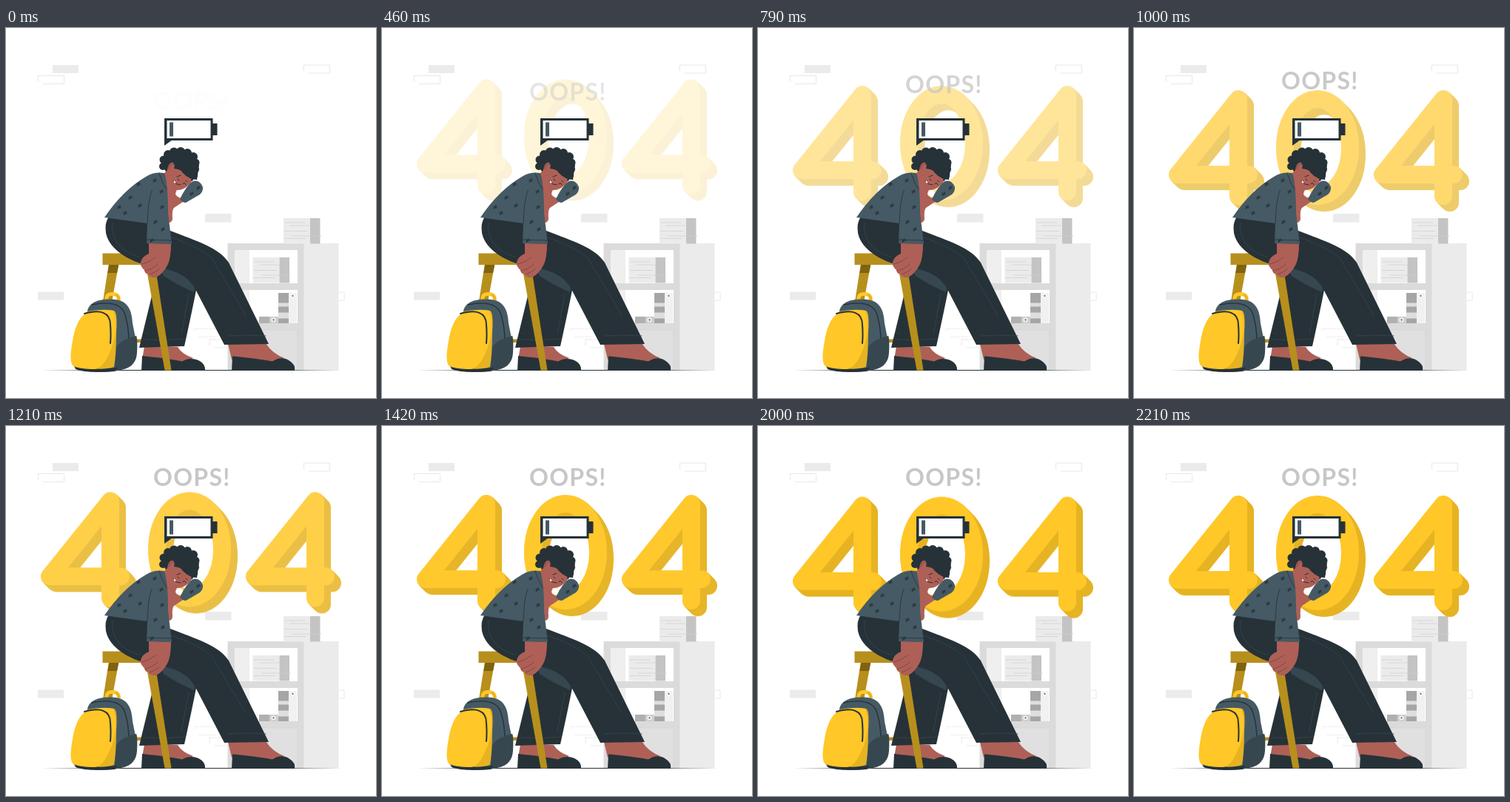
Recreate the animation shown at these times as an HTML page with a canvas. Size 500 by 500 pixels, loop 2.25 s.

```html
<!DOCTYPE html>
<html lang="en">
<head>
<meta charset="utf-8">
<title>404</title>
<style>
  html, body { margin: 0; width: 100%; height: 100%; overflow: hidden; background: #fff; }
  canvas { display: block; width: 100vw; height: 100vh; }
</style>
</head>
<body>
<canvas id="stage"></canvas>
<script>
const SIZE = 500, LOOP = 2250, STEPS = 54, RISE_STEPS = 26;
const ratio = Math.max(1, window.devicePixelRatio || 1);
const YELLOW = '#ffc727', AMBER = '#e6b323', DARK = '#263238', SLATE = '#455a64',
      MID = '#37474f', SKIN = '#ae6057', CREASE = '#7f3e3b', WOOD = '#b78f1d',
      PALE = '#ebebeb', GREY = '#c7c7c7';

function setup(canvas) {
  canvas.width = canvas.height = SIZE * ratio;
  const c = canvas.getContext('2d');
  c.scale(ratio, ratio);
  c.lineCap = c.lineJoin = 'round';
  return c;
}

function layer(paint) {
  const canvas = document.createElement('canvas');
  const c = setup(canvas);
  paint({
    c,
    fill(color, d) { c.fillStyle = color; c.fill(new Path2D(d)); },
    line(color, width, d) {
      c.strokeStyle = color;
      c.lineWidth = width;
      c.stroke(new Path2D(d));
    },
    rect(color, x, y, w, h) { c.fillStyle = color; c.fillRect(x, y, w, h); },
    oval(color, x, y, rx, ry = rx) {
      c.fillStyle = color;
      c.beginPath();
      c.ellipse(x, y, rx, ry, 0, 0, 7);
      c.fill();
    }
  });
  return canvas;
}

function papers({ rect, line }, x, y) {
  rect(PALE, x, y, 36, 34.5);
  rect('#c4c4c4', x + 36, y, 13.5, 34.5);
  [[6, 2, 29], [10, 9, 35], [17.5, 2, 32], [24, 12, 51], [27.5, 2, 30]].forEach(([dy, a, b]) =>
    line('#cfcfcf', 0.7, `M${x + a} ${y + dy}H${x + b}`));
}

const room = layer(p => {
  const { fill, line, rect, oval } = p;
  rect(PALE, 63, 50, 35, 11);
  rect(PALE, 269, 251, 35.5, 11.5);
  rect(PALE, 43, 356.5, 35, 11);
  [[43.5, 64.5], [402.5, 50], [422, 357], [275, 421]].forEach(([x, y]) =>
    line('#e6e6e6', 0.9, `M${x} ${y + 8}V${y}H${x + 35}V${y + 11}H${x + 7}`));
  line('#ececec', 0.8, 'M254 409V406.5H301M260 417.5H285');

  rect(PALE, 402, 291, 47.5, 171.5);
  rect('#dbdbdb', 299.5, 291, 103, 171.5);
  [300, 354].forEach(y => {
    rect('#efefef', 309, y, 20, 45);
    rect('#fff', 329, y, 65, 45);
  });
  rect('#e0e0e0', 309, 408, 85, 54.5);
  line('#d0d0d0', 0.6, 'M309 408H394V462');
  papers(p, 375, 257);
  papers(p, 333.5, 310);

  rect('#f1f1f1', 382, 358, 11, 41);
  rect('#a6a6a6', 368, 358, 14, 41);
  rect('#dedede', 368, 371.5, 14, 5);
  rect('#dedede', 368, 384.5, 14, 8);
  rect('#cfcfcf', 342, 390, 26, 9);
  rect('#b0b0b0', 342, 390, 14, 9);
  [[387.5, 362], [361.5, 394.5]].forEach(([x, y]) => {
    oval('#fff', x, y, 2.8);
    oval('#8f8f8f', x, y, 1.4);
  });
  fill(DARK, 'M47 462.5L150 461.9H350L453 462.5L350 463.1H150Z');
});

const four = x => `M${x} 237V106L${x - 82} 208H${x + 14}`;
const numerals = layer(({ c, line }) => {
  const zero = 'M204 171.5a44 65.5 0 1 1 88 0a44 65.5 0 1 1 -88 0Z';
  const paths = [four(141), zero, four(418)];
  for (let i = 18; i >= 0; i--) {
    c.save();
    c.translate(i / 2, i / 2);
    paths.forEach(d => line(i ? AMBER : YELLOW, 24, d));
    c.restore();
  }
});

function stool({ fill }) {
  fill(WOOD, 'M139 318H152.5L142 376H130Z');
  fill('#80620f', 'M139.5 319H152.5L150 331H137.5Z');
  fill(WOOD, 'M174 420.5H210V425H174Z');
  fill(WOOD, 'M130.5 304.5H200V320H130.5Z');
}

function legs({ fill, line }) {
  fill(SKIN, 'M187 430L232 431Q238 441 253 446L240 455L184 448Z');
  fill(DARK, 'M184 443C200 445 216 446 238 450.5C246 446 253 446 260 449Q270 454 269 463H183Z');
  fill(SKIN, 'M300 427L351 426Q360 440 376 446L362 455L305 448Z');
  fill(DARK, 'M306 443.5C322 445 342 447 360 450.5C368 445 376 445 382 449Q392 455 390 463H305Z');
  fill(DARK, 'M206 312L258 349Q252 380 241 430L180 432L206 325Z');
  fill(MID, 'M204 316L258 340L254 357Q231 347 213 335Z');
  fill(DARK, 'M139 255L190 262L222 274C258 288 288 297 301 317L355 427L295 428L257 355C248 337 233 329 210 324L187 320C165 313 140 300 135 277Q133 263 139 255Z');
  line(MID, 0.8, 'M144 263C141 283 153 302 180 309M224 283Q264 297 278 311L324 388M300 416Q326 414 351 416M186 421Q214 423 242 420M247 360L237 413');
}

function frontLeg({ fill }) {
  fill(WOOD, 'M189 321H201.5L223.5 462.5H214.5Z');
}

function head({ fill, line, oval }) {
  oval(DARK, 235, 185, 22, 18);
  [[212, 187, 5], [213, 178, 5.5], [219, 171, 6], [227, 167.5, 6], [236, 167, 6], [245, 169, 6],
   [253, 174, 6], [256, 182, 5.5], [256, 191, 5], [254, 199, 5], [249, 203, 4.5]]
    .forEach(([x, y, r]) => oval(DARK, x, y, r));
  fill(SKIN, 'M218 192Q220 180 226 182L230 190L242 194Q253 202 250 209Q242 218 234 219Q225 220 217 216L213 197Z');
  fill(DARK, 'M229 179L227 190Q236 190 239 196Q248 205 258 205L261 185Z');
  line(CREASE, 0.8, 'M220 190Q222 183 226 184');
  line(DARK, 1, 'M231 201L236 199M239 211Q241 207 243 212M232 204L234 206M243 206L245 208M226 206Q227 210 231 211L236 212');
  fill('#fff', 'M226.5 206L229.5 208.5L228.5 210Q226.5 209 226.5 206Z');
}

function star(line, x, y) {
  line(DARK, 1.1, `M${x - 2.2} ${y - 1}L${x + 2.2} ${y + 1}M${x + 1} ${y - 2.4}L${x - 1} ${y + 2.4}M${x + 2} ${y - 1}L${x - 2} ${y + 1.4}`);
}

function body({ fill, line }) {
  fill(SKIN, 'M214 212L230 218L232 228L242 233L227 243Q224 246 225 257Q225 263 219 263L213 225Z');
  fill('#fff', 'M230 221Q233 217 237 220Q242 224 237 228Q230 229 229 224Z');
  fill(SLATE, 'M235 231Q244 213 251 208Q258 204 264 211Q269 218 262 225L243 236Q238 236 235 231Z');
  fill(SLATE, 'M214 196Q200 194 189 201Q158 219 133 256L191 264L190 291L224 292L219 250Q219 211 214 196Z');
  line(DARK, 0.8, 'M191 264Q192 231 197 220M191 286L223 287M207 196Q211 209 217 218');
  [[179, 211], [201, 206], [168, 229], [153, 242], [161, 250], [181, 240], [210, 221],
   [211, 242], [202, 262], [212, 272], [197, 287], [251, 224], [260, 216]]
    .forEach(([x, y]) => star(line, x, y));
}

function hand({ fill, line }) {
  fill(SKIN, 'M193 291L223 292Q223 312 218 321Q212 332 203 337Q194 338 193 333Q187 332 187 327Q181 322 182 317Q183 309 193 305Z');
  line(CREASE, 0.8, 'M184 319Q193 317 202 310M188 328Q198 326 205 319M194 333Q201 331 207 326');
}

function backpack({ fill, line }) {
  line(YELLOW, 5, 'M136 368Q135 359.5 143 359.5Q152 358.5 152.5 367');
  line(AMBER, 3, 'M149 361Q152 362 152.5 367');
  fill(SLATE, 'M110 383C112 369 130 365 148 367C164 369 170 380 171 399L176 424L168 456Q153 467 118 464Q96 464 91 456Z');
  line(DARK, 1.4, 'M116 374Q155 366 161 388Q166 405 166 423');
  fill(MID, 'M149 431Q157 420 176 416Q178 419 177 439Q176 456 160 461L147 463Z');
  fill(DARK, 'M92 456Q120 462 151 459L147 464Q108 467 94 461Z');
  fill(AMBER, 'M110 383Q130 379 146 382Q151 384 149 412Q149 440 146 458Q134 462 116 460Z');
  fill(YELLOW, 'M107 386Q126 379 145 382C151 397 149 420 140 439Q132 458 121 461Q97 461 90 456Q85 449 90 423Q94 396 107 386Z');
  line(DARK, 2, 'M106 386C127 380 141 384 141 401Q142 415 141 426');
}

function battery({ fill, rect }) {
  rect(DARK, 214, 122, 65.5, 30);
  rect('#fff', 217.5, 125, 59, 24);
  rect(DARK, 279, 129, 6.5, 16);
  fill(DARK, 'M214 150V159L225 151Z');
  rect(SLATE, 221, 127.5, 5, 19);
}

const figure = layer(p => [battery, stool, legs, frontLeg, head, body, hand, backpack].forEach(f => f(p)));

// Slide-in easing that overshoots a little before settling
function backOut(x) {
  const bez = (a, b, s) => 3 * a * s * (1 - s) ** 2 + 3 * b * s * s * (1 - s) + s ** 3;
  let lo = 0, hi = 1;
  for (let i = 0; i < 24; i++) {
    const m = (lo + hi) / 2;
    if (bez(0.36, 0.5, m) < x) lo = m; else hi = m;
  }
  return bez(-0.01, 1.38, lo);
}

const ctx = setup(document.getElementById('stage'));

function put(image, alpha = 1, dy = 0) {
  ctx.globalAlpha = Math.min(1, Math.max(0, alpha));
  ctx.drawImage(image, 0, dy, SIZE, SIZE);
  ctx.globalAlpha = 1;
}

function draw(now) {
  const t = now % LOOP;
  const step = Math.min(STEPS, Math.floor((t + 4) * STEPS / LOOP) + 1);
  const drop = backOut(step / STEPS);
  const rise = Math.min(1, step / RISE_STEPS);

  ctx.fillStyle = '#fff';
  ctx.fillRect(0, 0, SIZE, SIZE);
  put(room);
  put(numerals, drop, 30 * (drop - 1));

  ctx.globalAlpha = rise;
  ctx.fillStyle = GREY;
  ctx.font = '700 32px Lato, sans-serif';
  ctx.letterSpacing = '1.3px';
  ctx.fillText('OOPS!', 199, 81.4 + 30 * (1 - rise));
  ctx.globalAlpha = 1;

  put(figure);
}

let start;
function loop(now) {
  if (start === undefined) start = now;
  draw(now - start);
  requestAnimationFrame(loop);
}
requestAnimationFrame(loop);
</script>
</body>
</html>
```
